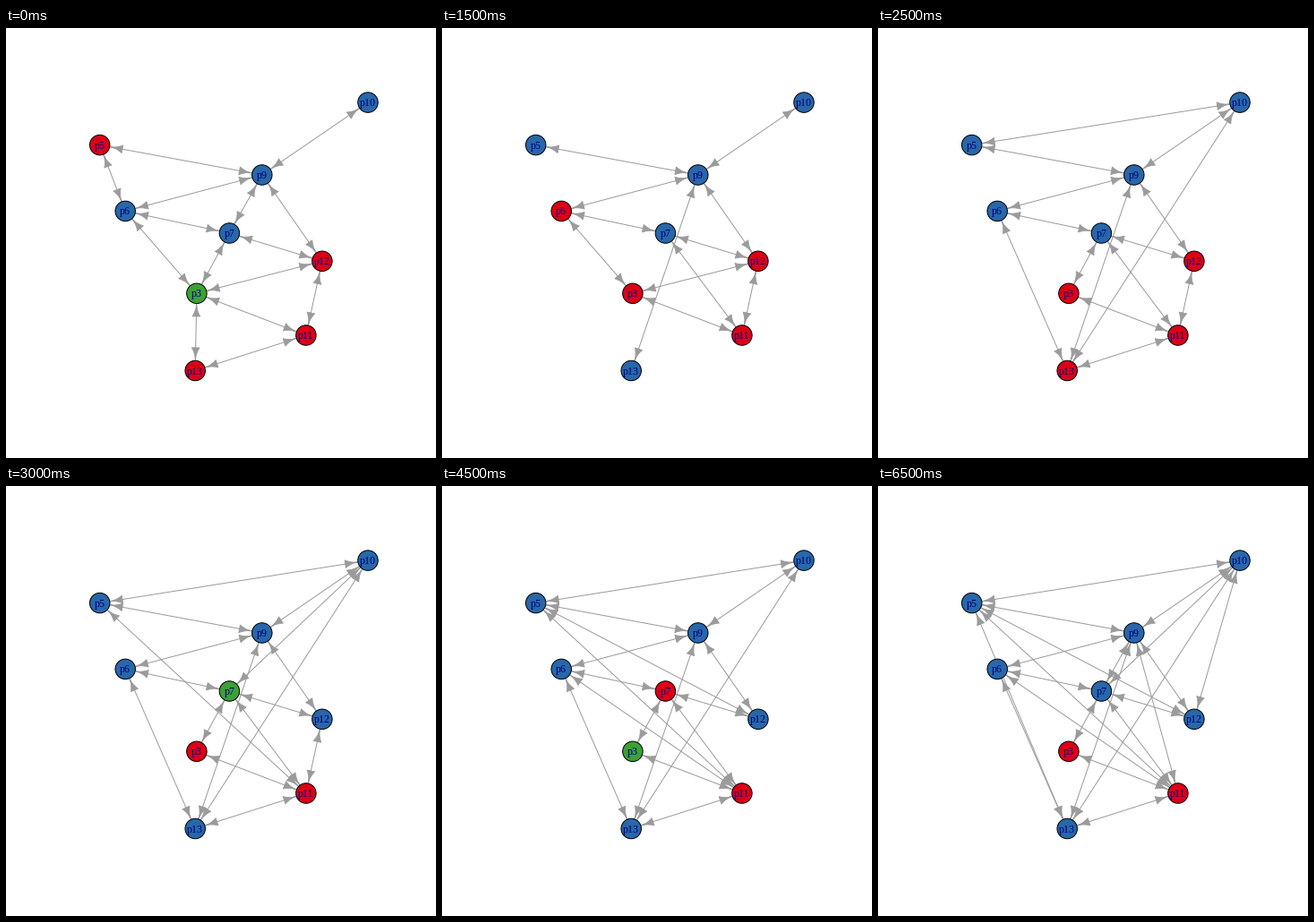
Write a matplotlib script that moves like this. It is 480 px wide and 480 px high and loops after 7 s.

```python
import numpy as np
import matplotlib.pyplot as plt
from matplotlib.animation import FuncAnimation
from matplotlib.collections import LineCollection, PolyCollection
from matplotlib.patches import Circle

SIZE, DPI = 480, 72
RADIUS = 11.23
HEAD, HALF = 14.4, 4.32          # arrowhead length and half width
GREY, NAVY = "#9b9b9b", "#00007b"
RED, BLUE, GREEN = "#dc0017", "#2867aa", "#3ba135"

NODES = {
    3: (212.9, 296.3), 5: (104.7, 130.6), 6: (133.2, 204.4),
    7: (249.4, 229.0), 9: (285.8, 164.0), 10: (404.0, 83.1),
    11: (334.9, 343.0), 12: (352.9, 260.3), 13: (211.2, 382.5),
}

START = "5-9 5-6 9-10 6-9 7-9 6-7 9-12 7-12 3-6 3-7 3-12 11-12 3-11 3-13 11-13"

# Each step: edges switched on or off, red nodes, green node
STEPS = [
    ("", {5, 11, 12, 13}, 3),
    ("3-13 5-6 12-13", {3, 5, 11, 12}, None),
    ("12-13 11-13 3-7 7-11", {3, 5, 6, 11, 12, 13}, None),
    ("7-9 9-13", {3, 6, 11, 12}, None),
    ("5-10 10-13 6-13 3-6 3-12", {3, 11}, 7),
    ("3-7 11-13", {3, 11, 12, 13}, None),
    ("5-11 7-10", {3, 11}, 7),
    ("6-11", {3, 6, 11, 12}, None),
    ("5-12 11-12", {3, 6, 11, 13}, None),
    ("7-10", {7, 11}, 3),
    ("5-6 5-11 12-13 7-9", {3, 11}, 7),
    ("5-6 5-13 10-12 9-11 6-12 7-12", {3, 6, 11, 13}, None),
    ("7-10 12-13", {3, 11}, None),
    ("5-11 7-12 6-12", {3, 11}, None),
]


def edge_set(text):
    return {tuple(map(int, pair.split("-"))) for pair in text.split()}


def edges_at(step):
    edges = edge_set(START)
    for toggles, _, _ in STEPS[:step + 1]:
        edges ^= edge_set(toggles)
    return sorted(edges)


def arrowhead(tip, direction):
    """Head with sides that widen with the square of the distance."""
    back = HEAD * np.sqrt(np.linspace(0, 1, 9))
    half = 0.07 + HALF * (back / HEAD) ** 2
    normal = np.array([-direction[1], direction[0]])
    spine = tip - np.outer(back, direction)
    side = np.outer(half, normal)
    return np.vstack([(spine + side)[::-1], spine - side])


def edge_shapes(a, b):
    p, q = np.array(NODES[a]), np.array(NODES[b])
    u = (q - p) / np.hypot(*(q - p))
    p, q = p + RADIUS * u, q - RADIUS * u
    return (p + 2 * u, q - 2 * u), [arrowhead(p, -u), arrowhead(q, u)]


fig = plt.figure(figsize=(SIZE / DPI, SIZE / DPI), dpi=DPI, facecolor="white")
ax = fig.add_axes([0, 0, 1, 1])
ax.set(xlim=(0, SIZE), ylim=(SIZE, 0))
ax.axis("off")

lines = LineCollection([], colors=GREY, linewidths=1, zorder=1)
heads = PolyCollection([], facecolors=GREY, edgecolors=GREY, linewidths=0.8,
                       joinstyle="round", zorder=2)
ax.add_collection(lines, autolim=False)
ax.add_collection(heads, autolim=False)

discs = {}
for name, (x, y) in NODES.items():
    discs[name] = ax.add_patch(Circle((x, y), RADIUS, ec="black", lw=1, zorder=3))
    ax.text(x, y + 4, f"p{name}", family="Liberation Serif", size=12,
            color=NAVY, ha="center", va="baseline", zorder=4)


def draw(step):
    _, reds, green = STEPS[step]
    shapes = [edge_shapes(a, b) for a, b in edges_at(step)]
    lines.set_segments([segment for segment, _ in shapes])
    heads.set_verts([head for _, pair in shapes for head in pair])
    for name, disc in discs.items():
        disc.set_facecolor(GREEN if name == green else RED if name in reds else BLUE)
    return [lines, heads, *discs.values()]


anim = FuncAnimation(fig, draw, frames=len(STEPS), interval=500,
                     repeat=True, repeat_delay=0, blit=False)
plt.show()
```
